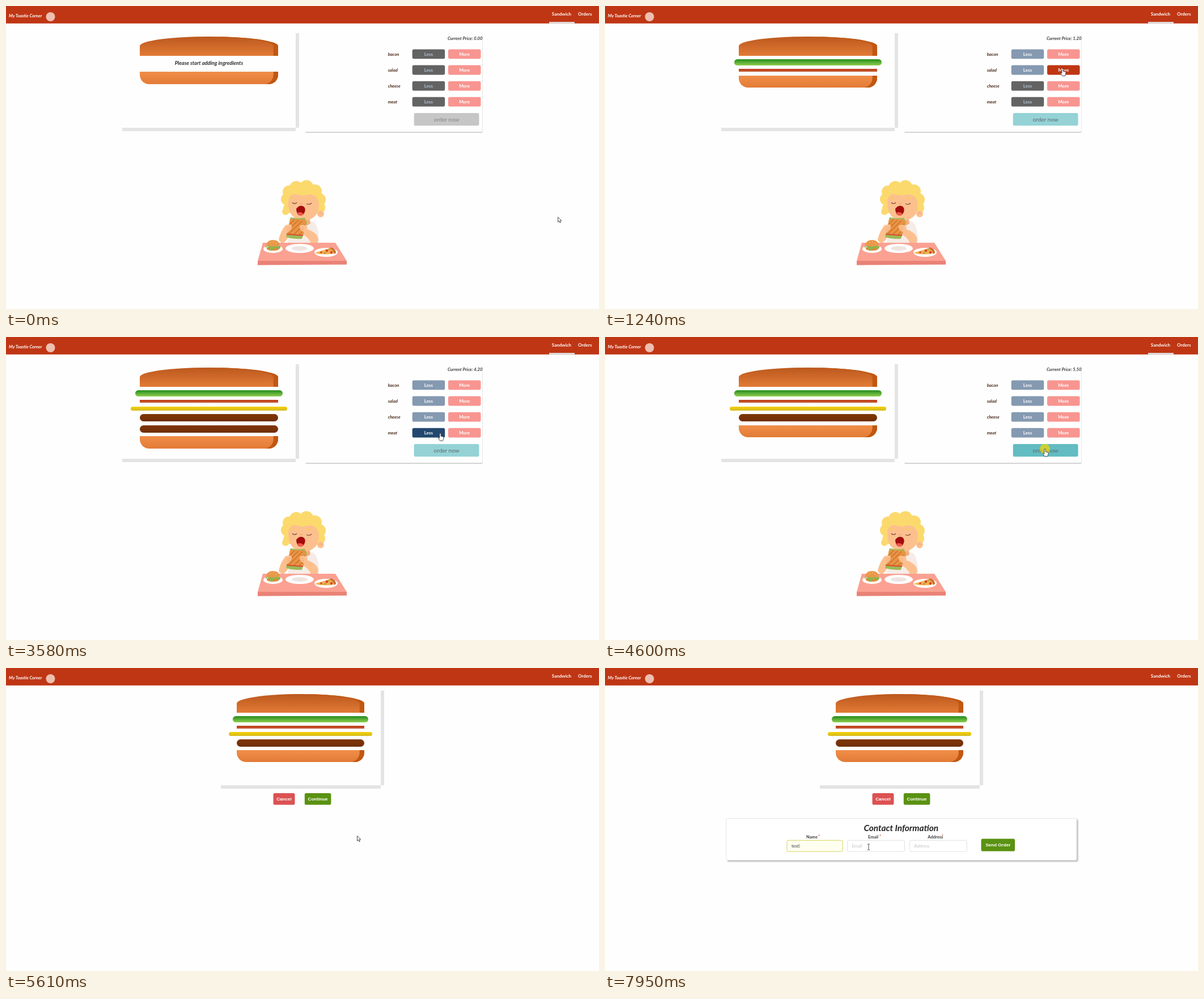
An HTML page for the animation above (8000 ms loop, 1046 by 535 pixels).

```html
<!DOCTYPE html>
<html lang="en">
<head>
<meta charset="utf-8">
<title>My Toastie Corner</title>
<style>
  html, body { margin: 0; width: 100%; height: 100%; overflow: hidden; background: #fefefe; }
  svg, .page, #shade { position: absolute; left: 0; top: 0; width: 1046px; height: 535px; overflow: hidden; }
  body { position: relative; font-family: Lato, sans-serif; }
  text { font: 7.7px Lato, sans-serif; fill: #3b3b3b; white-space: pre; }
  .bold { font-weight: 700; }
  .slant { font-style: italic; }
  .mid { text-anchor: middle; }
  .sans { font: 700 8.1px "Liberation Sans", Arial, sans-serif; }
  .white { fill: #fff; }
  .hint { fill: #c4c4c4; }

  .burger { position: absolute; display: flow-root; height: 167px;
    box-shadow: 6px 0 #e4e4e4, 0 6px #e4e4e4; }
  .burger > * { margin: 2% auto; width: 80%; }
  #build { left: 205px; top: 48px; width: 306px; }
  #review { left: 379px; top: 40px; width: 281.5px; }
  .top { height: 20%; background: linear-gradient(#bc581e, #e27b36);
    border-radius: 50% 50% 0 0; box-shadow: inset -8.3px 0 #c15711; }
  .bottom { height: 13%; background: linear-gradient(#f08e4a, #e27b36);
    border-radius: 0 0 16.5px 16.5px; box-shadow: inset -8.3px 0 #c15711; }
  .meat { height: 8%; background: linear-gradient(#7f3608, #702e05); border-radius: 8.3px; }
  .burger > .cheese { width: 90%; height: 4.5%; background: linear-gradient(#f4d004, #d6bb22); border-radius: 11px; }
  .burger > .salad { width: 85%; height: 7%; background: linear-gradient(#228c1d, #91ce50); border-radius: 11px; }
  .bacon { height: 3%; background: linear-gradient(#bf3813, #c45e38); }
  .empty { height: 16.7px; font: italic 700 9.3px/13.5px Lato, sans-serif; text-align: center; color: #2b2b2b; }

  #shade { background: rgba(253, 244, 242, .8); }
  #card { filter: drop-shadow(1px 1px .6px rgba(0, 0, 0, .55)); }
  #sheet { filter: drop-shadow(2px 2px 1.2px rgba(0, 0, 0, .28)); }
</style>
</head>
<body>
<div class="page" id="shop">
  <svg>
    <rect x="528" y="48" width="312.5" height="175" rx="2" fill="#f3f3f3"/>
    <rect x="528" y="50" width="312.5" height="173.4" rx="2" fill="#a9a9a9"/>
    <rect x="527.5" y="47" width="313" height="175.4" rx="2" fill="#fefefe"/>
    <text id="price" class="bold slant" x="840.5" y="60" text-anchor="end"></text>
    <g id="controls"></g>

    <g id="diner">
      <g fill="#fbd96d" id="hair"></g>
      <path d="M502 384q18-10 40-3q10 6 10 37h-55z" fill="#f6ece7"/>
      <path d="M511 372h24l2 12q-12 9-26 1z" fill="#f4ae7c"/>
      <path d="M498 347q0-14 12-15q14 5 22 1q14-2 19 11q5 30-23 35q-30 0-30-32z" fill="#fcc08f"/>
      <circle cx="555" cy="367" r="6" fill="#fcc08f"/>
      <path d="M552 367q3-4 5 0" fill="none" stroke="#ec9a6b"/>
      <path d="M505 347q4 4 8 0M530 349q5 3 9-1" fill="none" stroke="#7b4630" stroke-width="1.1"/>
      <path d="M502 341q4-4 9-2M529 339q6-2 10 2" fill="none" stroke="#f7cb58" stroke-width="1.6"/>
      <path d="M518 349q3 2 5-1" fill="none" stroke="#ea9667"/>
      <path d="M512 358q6-8 13-4q5 4 1 12q-4 6-10 3q-4-4-4-11z" fill="#a30d0d"/>
      <path d="M514 365q6-3 11 2q-4 5-9 2z" fill="#ef5a4b"/>
      <path d="M494 386q-9 10-13 26q2 7 9 6q8-6 13-22zM527 394q10 0 20 9q6 8 2 16h-11q-4-11-17-17z" fill="#fcc08f"/>
      <path d="M502 373q12 3 25 1l4 8-9 29q-14 1-28-3z" fill="#9cb957"/>
      <path d="M501 376l26 1 3 5-6 23-28-1z" fill="#e99443"/>
      <path d="M500 386l9-9M498 395l18-17M498 403l25-24M508 403l19-18M517 404l9-9" stroke="#c96f2e" stroke-width="1.4"/>
      <path d="M495 403l29 2" stroke="#d84c2d" stroke-width="2"/>
      <path d="M493 388q8-5 11 0q1 7-8 12q-7-3-3-12zM518 388q8-4 13 1q3 9-6 10q-8-3-7-11z" fill="#fcc08f"/>
      <path d="M495 392l7-1M495 396l6-1M519 392l7-1M520 395l6-1" stroke="#ec9a6b" stroke-width=".7"/>
      <path d="M453 418h128l20 32H444z" fill="#faa192"/>
      <path d="M444 450h157v6.5l-157 1z" fill="#e98276"/>
      <g fill="#fff">
        <ellipse cx="471" cy="429" rx="17" ry="7"/>
        <ellipse cx="518" cy="428" rx="25" ry="8"/>
        <ellipse cx="564.5" cy="435" rx="20.5" ry="8"/>
      </g>
      <ellipse cx="518" cy="428" rx="14" ry="4" fill="#ece5e2"/>
      <path d="M460 426h22v3q-2 3-11 3t-11-3z" fill="#dd8a3c"/>
      <path d="M458 424q13-3 26 0v3q-3 4-6 1t-7 2-7-2-6 0z" fill="#8eb44b"/>
      <path d="M459 423q1-10 12-10t12 10q-12 3-24 0z" fill="#e9984a"/>
      <path d="M466 418h1M471 416h1M476 419h1" stroke="#fff0c8"/>
      <path d="M544 436l29-9q8 3 9 9-18 5-38 0z" fill="#f3b04f"/>
      <path d="M573 426q9 3 9 10l-3 2q-1-7-8-10z" fill="#c6702e"/>
      <g fill="#d5412d"><circle cx="566" cy="432" r="2.2"/><circle cx="574" cy="435" r="2.2"/><circle cx="556" cy="435" r="1.8"/></g>
      <path d="M561 437l3-2M569 429l2 2" stroke="#68963c" stroke-width="1.3"/>
    </g>
  </svg>
  <div class="burger" id="build"></div>
</div>

<div class="page" id="checkout">
  <svg>
    <g id="actions"></g>
    <g id="form">
      <rect id="sheet" x="214" y="265.5" width="618" height="74" rx="2" fill="#fff" stroke="#dcdcdc" stroke-width=".7"/>
      <text class="bold slant mid" x="522.3" y="288" style="font-size:15.4px;fill:#222">Contact Information</text>
      <g id="fields"></g>
    </g>
  </svg>
  <div class="burger" id="review"></div>
</div>

<svg>
  <rect width="1046" height="30.8" fill="#bf3614"/>
  <text class="bold slant white" x="5" y="20">My Toastie Corner</text>
  <circle cx="78.5" cy="19" r="8" fill="#eebfb0"/>
  <rect id="tab" x="958" y="28" width="45" height="2.8" fill="#dedede"/>
  <text class="bold white mid" x="980" y="17" style="font-size:8px">Sandwich</text>
  <text class="bold white mid" x="1021.3" y="17" style="font-size:8px">Orders</text>
</svg>

<div id="shade"></div>
<svg id="modal">
  <rect id="card" x="380" y="167" width="286" height="167" rx="2" fill="#fff" stroke="#ccc" stroke-width=".7"/>
  <text class="bold" x="388.7" y="186.5" style="font-size:10.3px">Your Order</text>
  <text class="slant" x="388.7" y="206">A delicious Sandwich with the following ingredients:</text>
  <g id="list"></g>
  <text class="slant mid" x="522.5" y="276.5">total Cost: <tspan class="bold">5.50</tspan></text>
  <g id="choices"></g>
</svg>

<svg id="pointer">
  <circle id="click" r="9" fill="#f5d800" fill-opacity=".72"/>
  <path id="shape" stroke="#222" stroke-width=".8" stroke-linejoin="round"/>
</svg>

<script>
const LOOP = 8000, MODAL = 4690, CHECKOUT = 5610, FORM = 6410, FOCUS = 7260;
const RED = '#dc5252', GREEN = '#5a9212';
const el = id => document.getElementById(id);
const show = (node, on) => { node.style.visibility = on ? 'visible' : 'hidden'; };

// time, price, layers from top to bottom
const orders = [
  [0, '0.00', ''],
  [770, '0.70', 'bacon'],
  [1160, '1.20', 'salad bacon'],
  [1860, '1.60', 'salad bacon cheese'],
  [2490, '2.90', 'salad bacon cheese meat'],
  [3100, '4.20', 'salad bacon cheese meat meat'],
  [3880, '5.50', 'salad bacon cheese meat']
];
// time, x, y of the pointer tip
const path = [
  [0, 975, 375], [140, 783, 50], [240, 783, 50], [310, 790, 3], [460, 806, 76], [540, 808, 85],
  [850, 808, 86], [1080, 807, 109], [1470, 807, 112], [1580, 807, 128], [1700, 806, 144],
  [1940, 806, 147], [2090, 806, 148], [2170, 805, 162], [2340, 804.5, 167], [2580, 804.5, 167],
  [2790, 797, 175], [3110, 797, 175], [3190, 795, 173], [3340, 795, 173], [3580, 766, 170],
  [3880, 764, 170], [4110, 762, 170], [4280, 773, 196], [4430, 776, 197], [4690, 776, 198],
  [4840, 780, 217], [4960, 770, 228], [5380, 619.5, 296.5], [5640, 619.5, 296.5],
  [6160, 554, 226], [6480, 552, 222], [7110, 402, 317], [7260, 402, 317], [7480, 440, 445],
  [7620, 446, 446], [7900, 465, 316], [8000, 465, 316]
];
const clicks = [[690, 770], [1080, 1160], [1780, 1860], [2340, 2490], [2950, 3100],
  [3730, 3880], [4600, 4690], [5460, 5610], [6330, 6410], [7180, 7260]];
const typing = [[0, ''], [7480, 't'], [7580, 'te'], [7680, 'tes'], [7780, 'test']];
const shapes = {
  arrow: 'M0 0v8.8l2-1.9 1.4 3.2 1.5-.7-1.4-3h2.8z',
  hand: 'M-1.2 1a1.2 1.2 0 0 1 2.4 0v4l3.8.9q1.3.4 1.1 1.8l-.7 3.2-1 2.3h-4.8l-3.2-4.5q-.3-1.4 1-1.1l1.4 1.2z',
  beam: 'M-2.2-5h1.5l.7.6.7-.6h1.5M0-4.4v8.8M-2.2 5h1.5l.7-.6.7.6h1.5'
};

const latest = (steps, t) => steps.findLast(step => step[0] <= t);

function pointerAt(t) {
  const i = path.findIndex(p => p[0] > t);
  const [a, b] = [path[i - 1], path[i]];
  const k = (t - a[0]) / (b[0] - a[0]);
  return [a[1] + (b[1] - a[1]) * k, a[2] + (b[2] - a[2]) * k];
}

// Adds a rounded button and keeps its parts for recolouring.
function button(parent, label, x, y, w, h, fill, cls = 'sans', size = 8.1) {
  const g = document.createElementNS('http://www.w3.org/2000/svg', 'g');
  g.innerHTML = `<rect x="${x}" y="${y}" width="${w}" height="${h}" rx="2.8" fill="${fill}"/>
    <text class="mid white ${cls}" x="${x + w / 2}" y="${y + h / 2 + size * .35}" style="font-size:${size}px">${label}</text>`;
  el(parent).append(g);
  return {
    holds: ([px, py]) => px >= x && px <= x + w && py >= y && py <= y + h,
    paint(color, ink = '#fff') {
      g.firstChild.setAttribute('fill', color);
      g.lastChild.style.fill = ink;
    }
  };
}

function field(label, x, w) {
  el('fields').insertAdjacentHTML('beforeend', `
    <text class="bold mid" x="${x + w / 2 - 5}" y="301.3" style="font-size:7.5px">${label}</text>
    <text class="bold" x="${x + w / 2 + 6}" y="300" style="fill:#db4b28">*</text>
    <rect x="${x}" y="304.3" width="${w}" height="19.7" rx="2.2" fill="#fff" stroke="#dedede" stroke-width=".9"/>
    <text class="hint" x="${x + 8}" y="317">${label}</text>`);
  const [box, text] = [...el('fields').children].slice(-2);
  return { box, text, holds: ([px, py]) => px >= x && px <= x + w && py >= 304 && py <= 324 };
}

const stack = layers => '<div class="top"></div>' +
  (layers ? layers.split(' ').map(name => `<div class="${name}"></div>`).join('')
    : '<div class="empty">Please start adding ingredients</div>') +
  '<div class="bottom"></div>';

const rows = ['bacon', 'salad', 'cheese', 'meat'].map((name, i) => {
  const y = 76.5 + 28.1 * i;
  el('controls').insertAdjacentHTML('beforeend',
    `<text class="bold slant" x="673.7" y="${y + 11.2}" style="fill:#4a2a1c">${name}</text>`);
  return {
    name,
    less: button('controls', 'Less', 716.7, y, 57.5, 16.8, '#636363', 'bold', 8),
    more: button('controls', 'More', 780, y, 57.5, 16.8, '#f89590', 'bold', 8)
  };
});
const orderNow = button('controls', 'order now', 719.7, 189, 114.8, 22.2, '#c6c6c6', '', 10);
button('choices', 'Cancel', 397.5, 295, 37.5, 21, RED);
const accept = button('choices', 'Continue', 601, 295, 47, 21, GREEN);
const actions = [button('actions', 'Cancel', 471.5, 221, 38, 20.5, RED),
  button('actions', 'Continue', 526.8, 221, 46.6, 20.5, GREEN)];
const fields = [field('Name', 321, 98), field('Email', 427.5, 101), field('Address', 537.3, 101)];
button('fields', 'Send Order', 663.5, 301.5, 59.5, 22, GREEN);

['salad', 'bacon', 'cheese', 'meat'].forEach((name, i) => {
  const y = 224.7 + 11 * i;
  el('list').insertAdjacentHTML('beforeend',
    `<circle cx="404" cy="${y - 2.5}" r="1.4" fill="#333"/><text x="411.5" y="${y}">${name} : 1</text>`);
});
el('review').innerHTML = stack('salad bacon cheese meat');
el('hair').innerHTML = [[512, 321, 12], [530, 320, 12.5], [545, 327, 12], [552, 342, 12], [552, 356, 11],
  [499, 328, 11], [496, 341, 11], [498, 357, 9], [493, 363, 6], [525, 338, 20]]
  .map(([x, y, r]) => `<circle cx="${x}" cy="${y}" r="${r}"/>`).join('');

let shownLayers = null;

function paintShop(t, tip) {
  const [, price, layers] = latest(orders, t);
  if (layers !== shownLayers) el('build').innerHTML = stack(shownLayers = layers);
  el('price').textContent = `Current Price: ${price}`;
  const open = t < MODAL;
  let hot = false;
  for (const { name, less, more } of rows) {
    const used = layers.includes(name);
    const overLess = open && used && less.holds(tip), overMore = open && more.holds(tip);
    less.paint(overLess ? '#23486f' : used ? '#8599b1' : '#636363', used ? '#fff' : '#b4c3d2');
    more.paint(overMore ? '#bf3614' : '#f89590');
    hot ||= overLess || overMore;
  }
  const overOrder = open && layers && orderNow.holds(tip);
  orderNow.paint(!layers ? '#c6c6c6' : overOrder ? '#62bcc2' : '#94d2d6', layers ? '#5d6769' : '#858585');
  return hot || overOrder || (t > MODAL + 300 && accept.holds(tip));
}

function paintForm(t) {
  const focused = t >= FOCUS, typed = latest(typing, t)[1];
  const { box, text } = fields[0];
  box.setAttribute('fill', focused ? '#fffff0' : '#fff');
  box.setAttribute('stroke', focused ? '#d3cf4c' : '#dedede');
  text.textContent = typed ? typed + '|' : focused ? '|Name' : 'Name';
  text.style.fill = typed ? '#333' : '#c4c4c4';
}

function render(t) {
  const tip = pointerAt(t);
  const paid = t >= CHECKOUT, form = t >= FORM, modal = t >= MODAL && !paid;
  show(el('shop'), !paid);
  show(el('tab'), !paid);
  show(el('checkout'), paid);
  show(el('form'), form);
  show(el('shade'), modal);
  show(el('modal'), modal);

  const drop = 1 - Math.min(1, Math.max(0, (t - MODAL) / 300));
  const eased = 1 - drop ** 2.23;
  el('modal').style.opacity = eased;
  el('modal').style.transform = `translateY(${(eased - 1) * 535}px)`;

  const hot = paid ? actions.some(b => b.holds(tip)) : paintShop(t, tip);
  paintForm(t);
  const kind = hot ? 'hand' : form && fields.some(f => f.holds(tip)) ? 'beam' : 'arrow';
  el('shape').setAttribute('d', shapes[kind]);
  el('shape').setAttribute('fill', kind === 'beam' ? 'none' : '#fff');
  for (const id of ['shape', 'click']) el(id).setAttribute('transform', `translate(${tip})`);
  show(el('click'), clicks.some(([from, to]) => t >= from && t < to));
}

const start = performance.now();
(function tick() {
  render((performance.now() - start) % LOOP);
  requestAnimationFrame(tick);
})();
</script>
</body>
</html>
```
